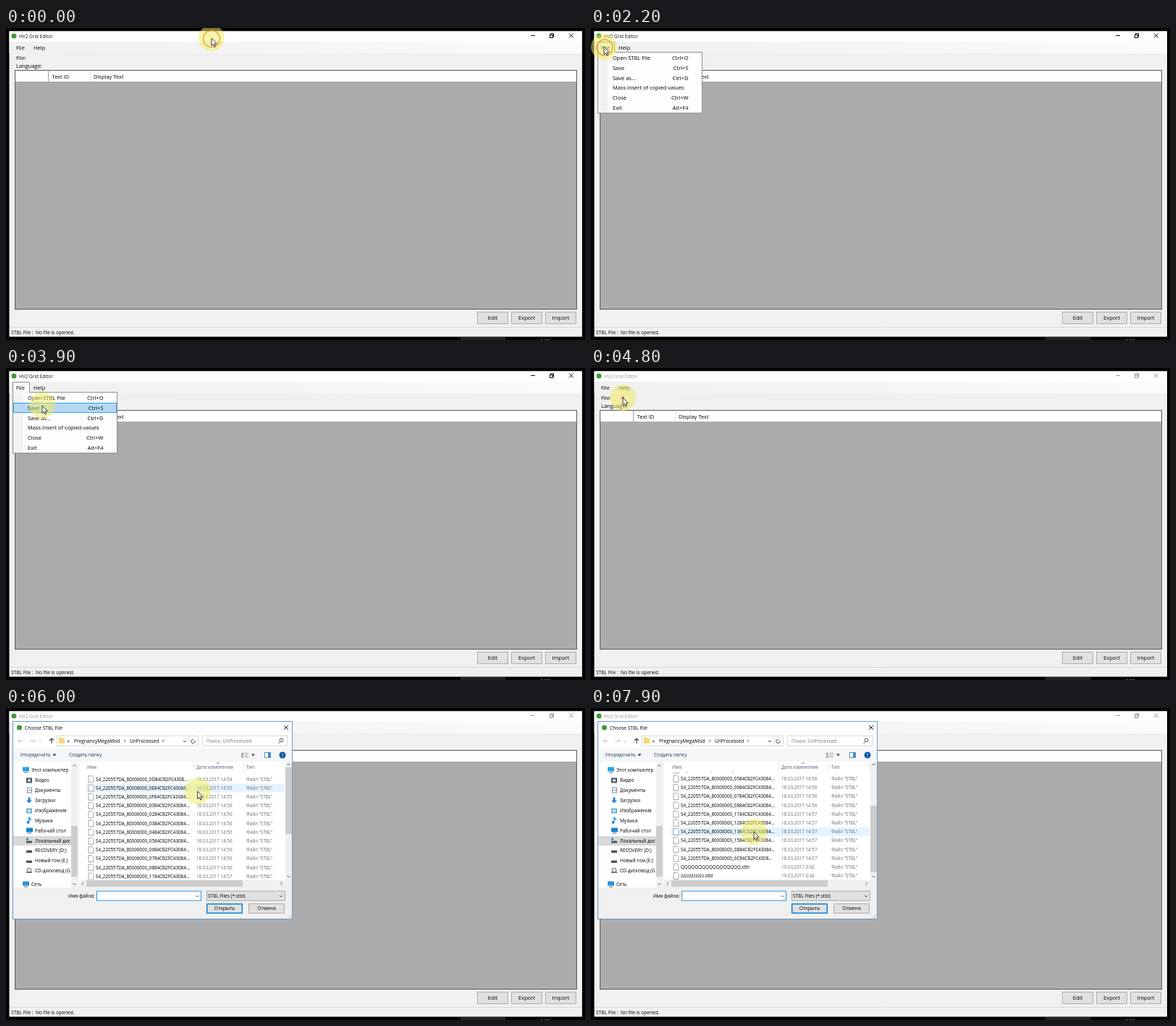
Recreate the animation shown at these times as an HTML page with a canvas. Size 800 by 431 pixels, loop 8000 ms.

```html
<!DOCTYPE html>
<html lang="ru">
<head>
<meta charset="utf-8">
<title>HV2 Grid Editor</title>
<style>
html, body { margin: 0; width: 100%; height: 100%; overflow: hidden; background: #000; }
canvas { display: block; }
</style>
</head>
<body>
<canvas id="stage" width="800" height="431"></canvas>
<script>
const g = document.getElementById('stage').getContext('2d');
const LOOP = 8000, STEP = 100;
const MENU_OPEN = 2200, MENU_CLOSE = 4600, DIALOG_OPEN = 5000;
const ROW = 12.2, MAX_SCROLL = 86;

// time, x, y of the pointer
const path = [
  [0, 284, 14], [900, 284, 14], [1900, 18, 26], [2900, 18, 26], [3000, 23, 33],
  [3400, 56, 62], [3700, 60, 82], [3900, 50, 52], [4100, 44, 41], [4900, 44, 41],
  [5400, 89, 80], [6100, 275, 117], [7300, 275, 117], [7900, 225, 171]
];

const menu = [
  ['Open STBL File', 'Ctrl+O'], ['Save', 'Ctrl+S'], ['Save as...', 'Ctrl+D'],
  ['Mass insert of copied values', ''], ['Close', 'Ctrl+W'], ['Exit', 'Alt+F4']
];

const files = '0D 0E 0F 00 02 03 04 05 06 07 08 11 12 13 15 0B 0C'.split(' ').map((id, i) => {
  const tail = id === '0D' || id === '0C' ? '4308...' : '43084...';
  const minute = i === 0 ? 54 : i < 3 ? 55 : i < 11 ? 56 : 57;
  return ['S4_220557DA_80000000_' + id + '84CB2FC' + tail, '18.03.2017 14:' + minute];
});
files.push(['Q'.repeat(17) + '.stbl', '19.03.2017 0:42'], ['z'.repeat(11) + '.stbl', '19.03.2017 0:42']);

// label, y, icon kind, icon colour
const tree = [
  ['Этот компьютер', 85.5, 'screen', '#2ba3e0'], ['Видео', 99.5, 'box', '#4a5560'],
  ['Документы', 113.5, 'page', '#7f8fa0'], ['Загрузки', 127.5, 'down', '#1e88d8'],
  ['Изображения', 141.5, 'box', '#6fb3d9'], ['Музыка', 155.5, 'note', '#1e90e0'],
  ['Рабочий стол', 169.5, 'screen', '#1583d0'], ['Локальный дис', 183.5, 'system', '#555'],
  ['RECOVERY (D:)', 197, 'disk', '#555'], ['Новый том (E:)', 211, 'disk', '#555'],
  ['CD-дисковод (G', 225, 'disc', '#777'], ['Сеть', 243.5, 'screen', '#2b93d0']
];

function rect(x, y, w, h, fill, stroke) {
  if (fill) { g.fillStyle = fill; g.fillRect(x, y, w, h); }
  if (stroke) { g.strokeStyle = stroke; g.lineWidth = 1; g.strokeRect(x + .5, y + .5, w - 1, h - 1); }
}
function text(s, x, y, size = 7.5, color = '#000', align = 'left') {
  g.font = size + 'px "Open Sans", "Noto Sans", sans-serif';
  g.fillStyle = color;
  g.textAlign = align;
  g.fillText(s, x, y + size * .36);
}
function line(points, color = '#333', width = 1) {
  g.beginPath();
  for (let i = 0; i < points.length; i += 2) g.lineTo(points[i], points[i + 1]);
  g.strokeStyle = color;
  g.lineWidth = width;
  g.stroke();
}
function poly(points, fill, stroke) {
  g.beginPath();
  for (let i = 0; i < points.length; i += 2) g.lineTo(points[i], points[i + 1]);
  g.closePath();
  if (fill) { g.fillStyle = fill; g.fill(); }
  if (stroke) { g.strokeStyle = stroke; g.lineWidth = .9; g.stroke(); }
}
function circle(x, y, r, fill, stroke, width = 1) {
  g.beginPath();
  g.arc(x, y, r, 0, Math.PI * 2);
  if (fill) { g.fillStyle = fill; g.fill(); }
  if (stroke) { g.strokeStyle = stroke; g.lineWidth = width; g.stroke(); }
}
function chevron(x, y, angle, color = '#555', s = 2, width = 1) {
  g.save();
  g.translate(x, y);
  g.rotate(angle * Math.PI / 180);
  line([-s, s / 2, 0, -s / 2, s, s / 2], color, width);
  g.restore();
}
function button(label, x, y, w, h, size, border = '#adadad') {
  rect(x, y, w, h, '#e1e1e1', border);
  text(label, x + w / 2, y + h / 2, size, '#000', 'center');
}

function pointerAt(t) {
  const i = path.findIndex(k => k[0] > t);
  if (i < 0) return path[path.length - 1].slice(1);
  const [t0, x0, y0] = path[i - 1], [t1, x1, y1] = path[i];
  let p = (t - t0) / (t1 - t0);
  if (t1 - t0 >= 600) p = p * p * (3 - 2 * p);
  return [x0 + (x1 - x0) * p, y0 + (y1 - y0) * p];
}

function drawWindow(active) {
  rect(0, 0, 800, 431, '#000');
  rect(628, 427, 62, 4, '#242424');
  text('0:52', 745, 432.5, 6.5, '#ccc', 'center');
  rect(4.5, 4.5, 791.5, 422, '#f0f0f0');
  rect(4.5, 4.5, 791.5, 14.5, '#fff');
  const shade = g.createLinearGradient(5, 0, 796, 0);
  shade.addColorStop(0, '#f0f0f0');
  shade.addColorStop(1, '#fbfbfc');
  rect(4.5, 19, 791.5, 16, shade);

  const ink = active ? '#111' : '#999';
  circle(11, 11, 3.5, '#3f9a35');
  text('HV2 Grid Editor', 18, 11.5, 6.5, ink);
  line([725, 10.5, 731, 10.5], ink);
  rect(751, 9, 5, 5, null, ink);
  line([752.5, 9, 752.5, 7.5, 756.5, 7.5, 756.5, 12, 755.5, 12], ink);
  line([778, 7.5, 784, 13.5], ink);
  line([784, 7.5, 778, 13.5], ink);

  text('File', 14, 27);
  text('Help', 38, 27);
  text('File:', 14, 41);
  text('Language:', 14, 52);

  rect(12, 58, 777, 331, '#ababab', '#5a5a5a');
  rect(13, 59, 775, 15, '#fff');
  line([58.5, 59, 58.5, 74], '#a0a0a0');
  line([116.5, 59, 116.5, 74], '#e2e2e2');
  text('Text ID', 63.5, 67.5);
  text('Display Text', 121, 67.5);

  button('Edit', 651, 392, 43, 17, 7.5);
  button('Export', 698, 392, 43, 17, 7.5);
  button('Import', 745, 392, 43, 17, 7.5);
  line([5, 413.5, 796, 413.5], '#d9d9d9');
  text('STBL File :  No file is opened.', 7, 420.5, 6.6);
}

function drawMenu(x, y) {
  rect(9, 19, 24, 16, '#f8f8f8', '#909090');
  text('File', 14, 27);
  rect(9, 33, 145, 85, '#fdfdfd', '#909090');
  rect(10, 34, 13, 83, '#f2f2f2');
  rect(10, 32, 22, 3, '#f8f8f8');
  menu.forEach(([label, keys], i) => {
    const top = 34 + i * 13.9;
    if (y >= top && y < top + 13.9 && x > 9) rect(10, Math.round(top), 143, 14, '#b5d9f5', '#3c9fe0');
    text(label, 30, top + 7);
    text(keys, 134.5, top + 7, 7.5, '#000', 'right');
  });
}

function treeIcon(kind, x, y, c) {
  if (kind === 'screen') {
    rect(x - 4, y - 4, 9, 6, c);
    rect(x - 2, y + 3, 5, 1, '#667');
  } else if (kind === 'box') {
    rect(x - 4, y - 3, 8, 7, c);
    rect(x - 2, y - 1, 4, 3, '#dbe9f2');
  } else if (kind === 'page') {
    rect(x - 3, y - 4, 7, 8, '#fff', c);
    line([x - 1, y, x + 3, y], c);
  } else if (kind === 'down') {
    poly([x - 1.5, y - 4, x + 1.5, y - 4, x + 1.5, y, x + 4, y, x, y + 4, x - 4, y, x - 1.5, y], c);
  } else if (kind === 'note') {
    circle(x - 1.5, y + 2.5, 2, c);
    line([x, y + 2, x, y - 4, x + 3, y - 1], c, 1.4);
  } else if (kind === 'disc') {
    circle(x, y - 1, 3, '#e4e4e4', c);
    rect(x - 4, y + 1, 8, 2, c);
  } else {
    rect(x - 4, y, 8, 3, c);
    rect(x - 4, y - 1, 8, 1, '#bbb');
    if (kind === 'system') rect(x - 4, y - 4, 3, 3, '#1b9be0');
  }
}

function drawList(scroll, x, y) {
  g.save();
  g.beginPath();
  g.rect(101, 88.5, 285, 148.5);
  g.clip();
  files.forEach(([name, date], i) => {
    const mid = 98.3 + i * ROW - scroll;
    if (x > 111 && x < 385 && Math.abs(y - mid) <= ROW / 2) rect(111, mid - 6, 274, 12, '#e5f3ff');
    poly([114, mid - 4.5, 118.5, mid - 4.5, 121, mid - 2, 121, mid + 4.5, 114, mid + 4.5], '#fff', '#999');
    text(name, 124, mid, 6.25);
    text(date, 263, mid, 6.25, '#6d6d6d');
    text('Файл "STBL"', 332, mid, 6.25, '#6d6d6d');
  });
  g.restore();
  text('Имя', 112, 82, 6.4, '#4c607a');
  text('Дата изменения', 263, 82, 6.4, '#4c607a');
  text('Тип', 332, 82, 6.4, '#4c607a');
  chevron(293, 76, 0, '#888');
  for (const cx of [259.5, 328.5, 384.5]) line([cx, 75, cx, 88], '#e5e5e5');

  rect(386, 74, 9, 163, '#f0f0f0');
  rect(386, 82 + scroll / MAX_SCROLL * 53, 9, 92, '#cdcdcd');
  chevron(390.5, 78, 0);
  chevron(390.5, 233, 180);
  rect(101, 237, 294, 11, '#f0f0f0');
  rect(111, 238, 216, 9, '#cdcdcd');
  chevron(106, 242.5, -90);
  chevron(380.5, 242.5, 90);
}

function drawDialog(t, x, y) {
  rect(9, 18, 387, 274, '#fff', '#6a9cc8');
  circle(18.5, 27, 3.5, '#3f9a35');
  text('Choose STBL File', 26, 27.5, 6.6);
  line([384, 24, 390, 30], '#222');
  line([390, 24, 384, 30], '#222');

  // address bar
  line([17, 45.5, 24, 45.5], '#c8c8c8');
  chevron(18.5, 45.5, -90, '#c8c8c8', 3);
  line([33, 45.5, 40, 45.5], '#c8c8c8');
  chevron(38.5, 45.5, 90, '#c8c8c8', 3);
  chevron(47, 46, 180, '#bbb', 1.5);
  line([63, 42, 63, 49], '#444', 1.2);
  chevron(63, 43.5, 0, '#444', 3, 1.2);
  rect(70, 38, 196, 15, '#fff', '#d9d9d9');
  rect(73, 41, 4, 2, '#e8b84a');
  rect(73, 42, 8, 7, '#f8d775');
  text('«', 84.5, 45, 7);
  text('PregnancyMegaMod', 94, 45.5, 6.65);
  chevron(164, 45.5, 90, '#444', 1.8);
  text('UnProcessed', 171, 45.5, 6.6);
  chevron(217, 45.5, 90, '#444', 1.8);
  chevron(247, 46, 180, '#444');
  line([253.5, 39, 253.5, 52], '#e2e2e2');
  g.beginPath();
  g.arc(258.5, 46, 2.6, -.5, 4.9);
  g.strokeStyle = '#444';
  g.lineWidth = 1;
  g.stroke();
  rect(271, 38, 118, 15, '#fff', '#d9d9d9');
  text('Поиск: UnProcessed', 277, 45.5, 6.5, '#777');
  circle(380.5, 44.5, 2.4, null, '#555');
  line([378.8, 46.5, 376.5, 49], '#555');

  // toolbar
  rect(10, 56, 385, 18, '#f5f6f7');
  text('Упорядочить', 19.5, 65, 6.5, '#1e395b');
  poly([64.5, 63.5, 69.5, 63.5, 67, 66.5], '#1e395b');
  text('Создать папку', 87, 65, 6.5, '#1e395b');
  for (let i = 0; i < 3; i++) {
    rect(325, 62 + i * 2.5, 3, 1.5, '#7a8a9a');
    rect(329, 62 + i * 2.5, 6, 1, '#aaa');
  }
  poly([339, 63.5, 344, 63.5, 341.5, 66.5], '#444');
  rect(357, 61, 9, 8, '#fff', '#5a8cba');
  rect(362, 62, 3, 6, '#3c8fd5');
  circle(382, 65, 4.5, '#0b57a8');
  text('?', 382, 65, 7, '#fff', 'center');

  // folder tree
  rect(10, 177, 80, 13, '#d9d9d9');
  g.save();
  g.beginPath();
  g.rect(10, 75, 80, 173);
  g.clip();
  tree.forEach(([label, ty, kind, color], i) => {
    const inset = i === 0 || i === 11 ? 0 : 5;
    treeIcon(kind, 27 + inset, ty, color);
    text(label, 35 + inset, ty, 6.5);
  });
  g.restore();
  rect(90, 75, 9, 173, '#f0f0f0');
  rect(90, 163, 9, 70, '#cdcdcd');
  chevron(94.5, 79.5, 0);
  chevron(94.5, 243.5, 180);
  line([100, 75, 100, 248], '#ececec');

  const notches = Math.max(0, Math.floor((t - 6400) / 100));
  drawList(Math.min(MAX_SCROLL, notches * 3 * ROW), x, y);

  // footer
  rect(10, 248, 385, 43, '#f0f0f0');
  text('Имя файла:', 122.5, 259.5, 6.5, '#000', 'right');
  rect(125, 252.5, 145, 14, '#fff', '#2f8fdd');
  chevron(264.5, 260, 180);
  if (Math.floor((t - DIALOG_OPEN) / 530) % 2 === 0) rect(127, 254, 1, 11, '#111');
  rect(277, 252.5, 109, 14, '#e1e1e1', '#adadad');
  text('STBL Files (*.stbl)', 279, 259.5, 6.5);
  chevron(380, 260, 180);
  button('Открыть', 277, 270, 50, 14, 6.8, '#0078d7');
  rect(278, 271, 48, 12, null, 'rgba(0,120,215,.4)');
  button('Отмена', 335, 270, 50, 14, 6.8);
  for (const [dx, dy] of [[4, 0], [2, 2], [4, 2], [0, 4], [2, 4], [4, 4]]) rect(389 + dx, 285 + dy, 1, 1, '#b0b0b0');
}

function ring(x, y, r) {
  if (r > 0 && r <= 12) circle(x, y, r, null, `hsl(${r * 2.1} 85% 58%)`, 1.1);
}

function drawPointer(t, x, y) {
  circle(x, y, 18, 'rgba(240,235,95,.52)');
  if (t < 900) ring(284, 15, 11.5 * (1 - t / 900));
  if (t >= MENU_OPEN && t < 3100) ring(19, 27, 11 * (1 - (t - MENU_OPEN) / 900));
  if (t > 4700 && t < 5700) ring(44, 41, (t - 4700) / 80);
  if (t >= 6500 && t < 7400) chevron(275, 115.5, 0, `rgba(90,225,80,${1 - (t - 6500) / 1800})`, 5.5, 1.8);

  g.save();
  g.translate(x, y);
  if (t >= 5300 && t < 5500) {
    poly([0, 0, 2, 0, 2, 4.5, 6, 5.5, 6.5, 9, 5, 12, 0, 12, -2.5, 7.5, -1.5, 6.5, 0, 8], '#fff', '#222');
  } else {
    poly([0, 0, 0, 10.5, 2.4, 8.3, 4, 12, 5.7, 11.2, 4.1, 7.8, 7.2, 7.6], '#fff', '#222');
  }
  g.restore();
}

function draw(t) {
  const [x, y] = pointerAt(t);
  drawWindow(t < MENU_CLOSE);
  if (t >= 1900 && t < MENU_OPEN) {
    rect(9, 19, 24, 15, '#b5d9f5', '#3c9fe0');
    text('File', 14, 27);
  }
  if (t >= MENU_OPEN && t < MENU_CLOSE) drawMenu(x, y);
  if (t >= DIALOG_OPEN) drawDialog(t, x, y);
  drawPointer(t, x, y);
}

const start = performance.now();
function tick() {
  const t = (performance.now() - start) % LOOP;
  draw(Math.floor(t / STEP) * STEP);
  requestAnimationFrame(tick);
}
tick();
</script>
</body>
</html>
```
